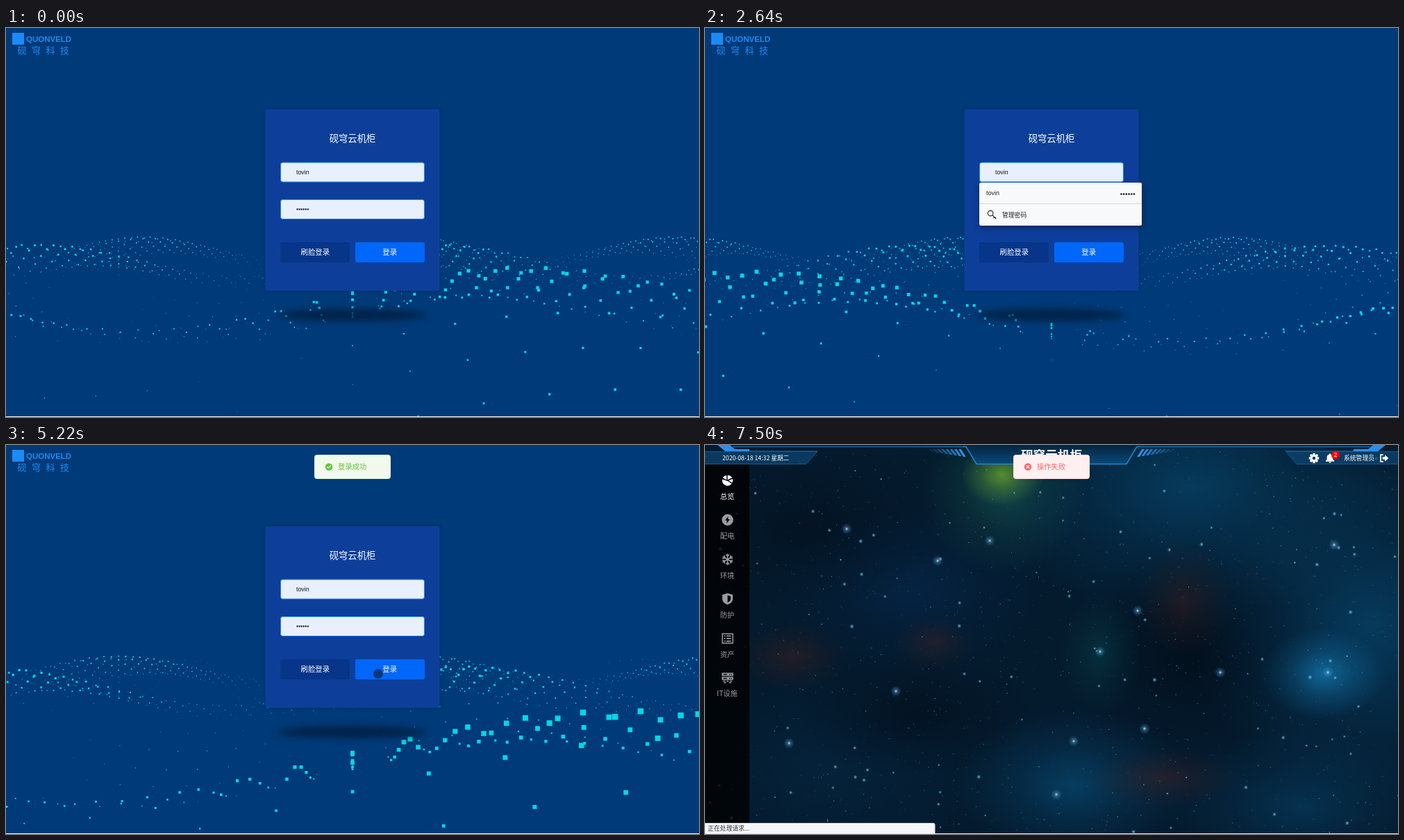
Recreate the animation shown at these times as an HTML page with a canvas. Size 998 by 561 pixels, loop 8000 ms.

```html
<!DOCTYPE html>
<html lang="zh-CN">
<head>
<meta charset="utf-8">
<style>
html, body { margin: 0; width: 100%; height: 100%; overflow: hidden; background: #fff }
canvas { display: block }
</style>
</head>
<body>
<canvas id="stage" width="998" height="561"></canvas>
<script>
const W = 998, H = 561, LOOP = 8000, STEP = 60;
const g = document.getElementById('stage').getContext('2d');
const CJK = '"Noto Sans CJK SC", "Noto Sans CJK", sans-serif';
const LATIN = '"Liberation Sans", Arial, sans-serif';
const PRODUCT = '砚穹云机柜', USER = 'tovin';

const clamp = v => Math.max(0, Math.min(1, v));

function text(s, x, y, size, color, { align = 'left', weight = 400, font = CJK } = {}) {
  g.font = `${weight} ${size}px ${font}`;
  g.textAlign = align;
  g.textBaseline = 'middle';
  g.fillStyle = color;
  g.fillText(s, x, y);
}

function box(x, y, w, h, r, fill, line) {
  g.beginPath();
  g.roundRect(x, y, w, h, r);
  g.fillStyle = fill;
  g.fill();
  if (line) { g.strokeStyle = line; g.lineWidth = 1; g.stroke(); }
}

function disc(x, y, r, color) {
  g.beginPath();
  g.arc(x, y, r, 0, 7);
  g.fillStyle = color;
  g.fill();
}

function path(d, fill, line, width = 1) {
  const p = new Path2D(d);
  if (fill) { g.fillStyle = fill; g.fill(p, 'evenodd'); }
  if (line) { g.strokeStyle = line; g.lineWidth = width; g.stroke(p); }
}

// Icons live on a 24 unit grid and are centred on x, y.
function icon(d, x, y, size, color, line) {
  g.save();
  g.translate(x - size / 2, y - size / 2);
  g.scale(size / 24, size / 24);
  path(d, line ? null : color, line ? color : null, line);
  g.restore();
}

function dots(x, y, gap, r) {
  for (let i = 0; i < 6; i++) disc(x + i * gap, y, r, '#111');
}

// ---- particle waves ----
const PHASE = [[0, 0], [960, 4.64], [1920, 8.72], [3360, 14.44], [4080, 16.99],
  [4260, 17.21], [5220, 20.61], [5760, 22.53]];

function phaseAt(t) {
  for (let i = 1; i < PHASE.length; i++) {
    const [t0, a] = PHASE[i - 1], [t1, b] = PHASE[i];
    if (t <= t1) return a + (b - a) * (t - t0) / (t1 - t0);
  }
  return PHASE.at(-1)[1];
}

function waves(t) {
  const c = phaseAt(t);
  g.fillStyle = '#00d7e8';
  for (let row = 40; row >= 1; row--) {
    const s = 677 / (row + 2.16);
    const lift = Math.cos(.5 * (row + 2.98 - c));
    const swell = Math.cos(.5 * (row + .93 - c));
    const n = Math.min(50, Math.ceil(510 / s));
    for (let col = -n; col <= n; col++) {
      const side = Math.cos(.3 * (col - 4.47 + c));
      const x = 499 + col * s;
      const y = 280 + s * (2.827 - .833 * (side + lift));
      const size = s * Math.abs(.038 + .035 * (side + swell));
      g.fillRect(x - size / 2, y - size / 2, size, size);
    }
  }
}

// ---- login page ----
function field(y) {
  box(395.5, y + .5, 207, 28, 3, '#e8f0fe', '#1c86ee');
}

function dropdown() {
  g.save();
  g.shadowColor = 'rgba(0,0,0,.4)';
  g.shadowBlur = 8;
  g.shadowOffsetY = 3;
  box(395, 223, 234, 62, 2, '#f8f9fb');
  g.restore();
  g.fillStyle = '#d4d6da';
  g.fillRect(395, 253, 234, 1);
  text(USER, 405, 239, 9, '#222', { font: LATIN });
  dots(599.5, 239.5, 3.7, 1.3);
  icon('M9 3a6 6 0 100 12 6 6 0 000-12zM7.500 7.500h.1M13 13l8 8v-3M18 18l-2 2', 413, 269, 15, '#222', 1.8);
  text('管理密码', 428, 269.5, 8.8, '#222');
}

function login(t) {
  g.fillStyle = '#003a78';
  g.fillRect(0, 0, W, H);
  waves(t);

  g.save();
  g.filter = 'blur(5px)';
  g.fillStyle = 'rgba(1,28,58,.75)';
  g.beginPath();
  g.ellipse(498, 414, 107, 9, 0, 0, 7);
  g.fill();
  g.restore();

  g.fillStyle = '#1b8cf5';
  g.fillRect(9, 7, 17, 17);
  text('QUONVELD', 29, 17, 11.5, '#1b8cf5', { weight: 700, font: LATIN });
  [...'砚穹科技'].forEach((ch, i) =>
    text(ch, 23 + i * 20.5, 32, 13, '#1b8cf5', { align: 'center' }));

  g.save();
  g.shadowColor = 'rgba(0,20,60,.3)';
  g.shadowBlur = 4;
  box(373.5, 117, 251, 262, 2, '#0d3f9a');
  g.restore();
  text(PRODUCT, 499, 158.5, 13.3, '#fff', { align: 'center' });
  field(193.5);
  text(USER, 418, 208.5, 8.8, '#111', { font: LATIN });
  field(247);
  dots(419.5, 261.5, 3.05, 1.15);
  box(395, 309, 100, 29, 2.5, '#06358a');
  box(503, 309, 100, 29, 2.5, '#0067fb');
  text('刷脸登录', 445.3, 323.5, 10.4, '#fff', { align: 'center', weight: 500 });
  text('登录', 552.7, 323.5, 10.4, '#fff', { align: 'center', weight: 500 });
  if (t >= 1260 && t < 2820) dropdown();
  if (t >= 4680) disc(536, 330, 7, 'rgba(8,48,104,.85)');

  if (t >= 4860) {
    const left = 1 - clamp((t - 4860) / 360);
    toast('登录成功', true, 14 - 35 * left ** 2.5, 1 - left ** 2);
  }
  g.fillStyle = '#f4f6f8';
  g.fillRect(0, 560, W, 1);
}

function toast(label, ok, y, alpha = 1) {
  const color = ok ? '#67c23a' : '#f56c6c';
  g.save();
  g.globalAlpha *= alpha;
  box(444.5, y + .5, 109, 34, 3, ok ? '#f0f9eb' : '#fef0f0', ok ? '#e1f3d8' : '#fde2e2');
  disc(465, y + 17.5, 5.2, color);
  icon(ok ? 'M6 12l4 4 8-8' : 'M7 7l10 10M17 7L7 17', 465, y + 17.5, 10.5, '#fff', 2.6);
  text(label, 478, y + 17.5, 10.3, color);
  g.restore();
}

// ---- night sky, drawn once ----
function makeSky() {
  const sky = document.createElement('canvas');
  sky.width = W;
  sky.height = H;
  const k = sky.getContext('2d');
  let seed = 7;
  const rnd = () => (seed = (seed * 16807) % 2147483647) / 2147483647;
  const glow = (x, y, rx, ry, rgb, a) => {
    const f = k.createRadialGradient(0, 0, 0, 0, 0, 1);
    f.addColorStop(0, `rgba(${rgb},${a})`);
    f.addColorStop(.5, `rgba(${rgb},${a * .4})`);
    f.addColorStop(1, `rgba(${rgb},0)`);
    k.save();
    k.translate(x, y);
    k.scale(rx, ry);
    k.fillStyle = f;
    k.fillRect(-1, -1, 2, 2);
    k.restore();
  };
  k.fillStyle = '#041a2d';
  k.fillRect(0, 0, W, H);
  const blue = '8,84,130', rust = '80,34,28', black = '2,9,18';
  glow(700, 60, 330, 190, blue, .55);
  glow(960, 260, 260, 260, blue, .55);
  glow(890, 330, 90, 65, '20,125,185', .7);
  glow(530, 490, 170, 110, blue, .6);
  glow(860, 520, 200, 110, blue, .4);
  glow(300, 210, 200, 120, '6,44,88', .5);
  glow(180, 470, 260, 150, '5,42,72', .5);
  glow(430, 65, 120, 120, '24,92,80', .6);
  glow(428, 43, 60, 45, '110,165,40', .75);
  glow(570, 300, 60, 90, '10,95,100', .4);
  glow(700, 300, 190, 160, black, .6);
  glow(300, 390, 170, 90, black, .5);
  glow(150, 120, 190, 120, black, .4);
  glow(690, 225, 70, 80, rust, .35);
  glow(125, 305, 80, 50, rust, .4);
  glow(330, 285, 60, 40, rust, .35);
  glow(660, 480, 110, 45, rust, .4);
  for (let i = 0; i < 1700; i++) {
    k.fillStyle = `rgba(${110 + rnd() * 70},190,220,${.15 + rnd() ** 3 * .7})`;
    const s = .6 + rnd() * .7;
    k.fillRect(rnd() * W, rnd() * H, s, s);
  }
  for (let i = 0; i < 110; i++) {
    const x = rnd() * W, y = rnd() * H, r = 1.5 + rnd() * 2;
    glow(x, y, r, r, '120,205,235', .9);
  }
  for (const [x, y] of [[633, 409], [506, 504], [121, 430], [906, 144], [531, 427], [569, 298],
    [897, 328], [623, 239], [410, 138], [335, 167], [275, 355], [742, 328], [204, 121]]) {
    glow(x, y, 8, 8, '90,165,215', .7);
    glow(x, y, 2.2, 2.2, '205,235,245', 1);
  }
  return sky;
}
const sky = makeSky();

// ---- dashboard ----
const flake = Array.from({ length: 6 }, (_, i) => {
  const at = (r, off) => {
    const a = i * Math.PI / 3 + Math.PI / 6 + off;
    return `${12 + r * Math.cos(a)} ${12 + r * Math.sin(a)}`;
  };
  return `M12 12L${at(11, 0)}M${at(10, .35)}L${at(6, 0)}L${at(10, -.35)}`;
}).join('');
const listRows = [6, 11, 16].map(y => `M5.500 ${y}h2.500v2.200h-2.500zM10 ${y}h8.500v2.200H10z`).join('');
const racks = [2, 9.5].map(y => `M1 ${y}h22v6H1zM4 ${y + 2}v2h7v-2zM15 ${y + 2}v2h2v-2zM18.500 ${y + 2}v2h2v-2z`).join('');

const MENU = [
  ['总览', 'M10 11L2.600 7A10 10 0 0110 2.200zM12 2a10 10 0 018.700 5L12 11zM21.600 9A10 10 0 0121 16.400L14 12.500zM12 13.400l8 4.600A10 10 0 012.100 10z'],
  ['配电', 'M12 1a11 11 0 100 22 11 11 0 000-22zM13.500 5L7 13h4l-1 6 6.500-8.500h-4z'],
  ['环境', flake, 2],
  ['防护', 'M12 1l10 3v8c0 5-4 9-10 11C6 21 2 17 2 12V4zM12 5v14c4-2 6-4 6-7V7z'],
  ['资产', 'M1 2h22v20H1zM3 4v16h18V4z' + listRows],
  ['IT设施', racks + 'M3 17h5v2H3zM10 17h4v2h-4zM16 17h5v2h-5zM5 20h4v2H5zM15 20h4v2h-4z']
];

function sidebar(alpha) {
  g.save();
  g.globalAlpha = alpha;
  g.fillStyle = 'rgba(0,0,0,.78)';
  g.fillRect(0, 28, 64, 532);
  MENU.forEach(([label, d, line], i) => {
    const color = i ? '#999da1' : '#fff';
    icon(d, 32.5, 51 + i * 57, 18, color, line);
    text(label, 32, 74 + i * 56.9, 10.3, color, { align: 'center', weight: i ? 400 : 500 });
  });
  g.restore();
}

function headerSide() {
  path('M0 9H162L146 28H0z', 'rgba(14,70,118,.7)');
  path('M0 9.500H162L146 27.500H0', null, 'rgba(40,120,180,.45)');
  path('M18 0H36L43 6H64V9H29z', '#2a8eec');
  path('M40 2.500H373', null, '#1568a8', 1.6);
  path('M64 8.500H162', null, 'rgba(36,120,190,.5)');
  for (let i = 0; i < 8; i++) {
    const x = 321 + i * 6.3;
    path(`M${x} 6h3.600l7 ${4 + i}h-3.600z`, `rgba(48,150,240,${.2 + i * .11})`);
  }
}

function header() {
  headerSide();
  g.save();
  g.translate(W, 0);
  g.scale(-1, 1);
  headerSide();
  g.restore();
  const fill = g.createLinearGradient(0, 0, 0, 28);
  fill.addColorStop(0, '#04243f');
  fill.addColorStop(1, '#0a4a78');
  path('M374 0L391 28H607L624 0z', fill);
  path('M372 2.500H376L391 27.500H607L622 2.500H626', null, '#1d84cc', 1.6);
  text(PRODUCT, 499, 14, 17.6, '#fff', { align: 'center', weight: 700 });
  text('2020-08-18 14:32 星期二', 25, 18.5, 8.7, '#fff', { weight: 500 });

  disc(877, 19, 5.6, '#fff');
  g.save();
  g.translate(877, 19);
  g.fillStyle = '#fff';
  for (let i = 0; i < 4; i++) {
    g.fillRect(-1.6, -7.2, 3.2, 14.4);
    g.rotate(Math.PI / 4);
  }
  g.restore();
  disc(877, 19, 2.2, '#0b3557');
  icon('M12 23a2.500 2.500 0 002.500-2.500h-5A2.500 2.500 0 0012 23zM19 15v-5c0-3.500-2-6-5.500-6.800V2.500a1.500 1.500 0 00-3 0v.7C7 4 5 6.500 5 10v5l-3 3v1.500h20V18z', 900, 19, 15, '#fff');
  text('系统管理员', 920, 18.5, 8.8, '#fff', { weight: 500 });
  icon('M10 2H2v20h8v-3H5V5h5zM14 4l9 8-9 8v-5H8V9h6z', 978, 19, 14, '#fff');
}

function status(label) {
  box(-3, 545.5, 334, 20, 2, '#f5f6f7', '#cfd1d4');
  text(label, 4, 553, 8.8, '#333');
}

function dashboard(t) {
  const loaded = t < 6540 ? 55 : t < 6600 ? 200 : t < 6660 ? 400 : 560;
  g.drawImage(sky, 0, 0, W, loaded, 0, 0, W, loaded);
  if (t < 6480) disc(536, 330, 8, 'rgba(0,0,0,.035)');
  sidebar(clamp((t - 6240) / 450));
  header();
  status(t < 6780 ? '正在等待 192.168.10.244...' : '正在处理请求...');
  g.fillStyle = '#e4e6e8';
  g.fillRect(0, 560, W, 1);
  if (t >= 7500) {
    disc(908, 14.5, 6, '#f00');
    text('2', 908, 15, 9, '#fff', { align: 'center', font: LATIN });
    toast('操作失败', false, 14);
  }
}

function draw(now) {
  let t = Math.floor(now % LOOP / STEP) * STEP;
  if (t > 4080 && t < 4260) t = 4080;
  if (t > 5760 && t < 6120) t = 5760;
  g.globalAlpha = 1;
  g.fillStyle = '#fff';
  g.fillRect(0, 0, W, H);
  g.globalAlpha = t < 6120 ? 1 : clamp(1 - (t - 6060) / 365);
  if (g.globalAlpha > 0 && t < 6480) login(t);
  g.globalAlpha = 1;
  if (t >= 6300) dashboard(t);
}

const start = performance.now();
function tick() {
  draw(performance.now() - start);
  requestAnimationFrame(tick);
}
tick();
</script>
</body>
</html>
```
